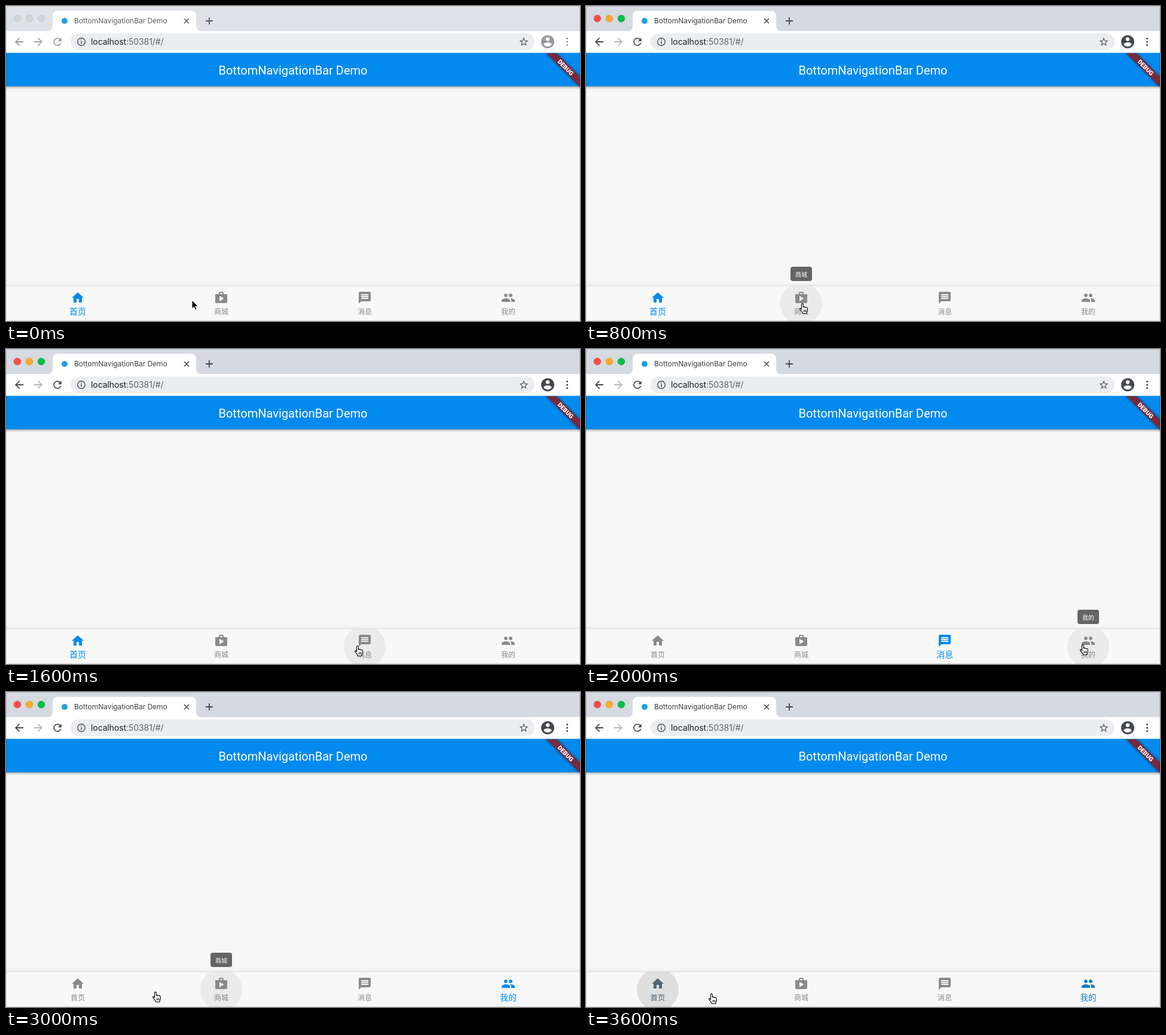
Write an HTML page that moves like this. It is 960 by 528 pixels and loops after 3.8 s.

```html
<!DOCTYPE html>
<html lang="zh">
<head>
<meta charset="utf-8">
<title>BottomNavigationBar Demo</title>
<style>
  html, body { margin: 0; width: 100%; height: 100%; overflow: hidden; }
  svg { display: block; width: 960px; height: 528px; --strip: #d5d9e0; --ink: #44484c; --dim: #b4b7ba; --title: #3c4043; --plus: #44484c; }
  svg.idle { --strip: #dfe2e6; --ink: #96999d; --dim: #a2a5a8; --title: #5c6064; --plus: #55595d; }
  .idle .light { fill: #d2d5d8; stroke: #c2c5c8; }
  .ui { font-family: Inter, Roboto, sans-serif; }
  .app { font-family: Roboto, sans-serif; text-anchor: middle; fill: #fff; }
  .cjk { font-family: "Noto Sans CJK SC", "Noto Sans CJK", sans-serif; text-anchor: middle; }
  .ink { fill: var(--ink); }
</style>
</head>
<body>
<svg id="stage" viewBox="0 0 960 528">
  <defs>
    <linearGradient id="drop" x2="0" y2="1">
      <stop stop-color="#4a3a30" stop-opacity=".5"/>
      <stop offset=".4" stop-color="#000" stop-opacity=".15"/>
      <stop offset="1" stop-color="#000" stop-opacity="0"/>
    </linearGradient>
    <linearGradient id="lift" x2="0" y2="1">
      <stop stop-color="#000" stop-opacity="0"/>
      <stop offset="1" stop-color="#000" stop-opacity=".05"/>
    </linearGradient>
    <filter id="blur" x="-20%" y="-60%" width="140%" height="220%"><feGaussianBlur stdDeviation="2.5"/></filter>
    <clipPath id="page"><rect y="79" width="960" height="449"/></clipPath>
    <clipPath id="bar"><rect y="469" width="960" height="59"/></clipPath>
  </defs>

  <!-- browser -->
  <rect width="960" height="42" fill="var(--strip)"/>
  <rect y="42" width="960" height="37" fill="#fff"/>
  <path d="M70 42a8 8 0 0 0 8-8V16a8 8 0 0 1 8-8H310a8 8 0 0 1 8 8V34a8 8 0 0 0 8 8Z" fill="#fff"/>
  <g stroke-width=".8">
    <circle class="light" cx="19" cy="21" r="5.8" fill="#fc4b48" stroke="#e0403d"/>
    <circle class="light" cx="39" cy="21" r="5.8" fill="#fdaa2c" stroke="#e0962a"/>
    <circle class="light" cx="59" cy="21" r="5.8" fill="#05c043" stroke="#08a63c"/>
  </g>
  <circle cx="98" cy="25" r="5" fill="#1f9fe0"/>
  <text class="ui" x="114" y="29" font-size="12" letter-spacing="-.05" fill="var(--title)">BottomNavigationBar Demo</text>
  <path d="M298 21l8 8m0-8l-8 8" stroke="var(--plus)" stroke-width="1.6"/>
  <path d="M334 25h12m-6-6v12" stroke="var(--plus)" stroke-width="1.8"/>
  <rect x="108" y="46" width="776" height="28" rx="14" fill="#ebedf0"/>
  <circle cx="126" cy="60" r="6.3" fill="none" stroke="#4a4e52" stroke-width="1.4"/>
  <path d="M126 59v4.4m0-7.4v1.6" stroke="#4a4e52" stroke-width="1.5"/>
  <text class="ui" x="142" y="65" font-size="14" letter-spacing="-.08" fill="#202124">localhost<tspan fill="#5f6368">:50381/#/</tspan></text>
  <g id="tools"></g>
  <g class="ink"><circle cx="938.5" cy="54.5" r="1.6"/><circle cx="938.5" cy="60" r="1.6"/><circle cx="938.5" cy="65.5" r="1.6"/></g>

  <!-- page -->
  <rect y="79" width="960" height="449" fill="#f7f7f7"/>
  <rect y="134" width="960" height="6" fill="url(#drop)"/>
  <rect y="78.5" width="960" height="56" fill="#028aee"/>
  <text class="app" x="480" y="114.5" font-size="20">BottomNavigationBar Demo</text>
  <g clip-path="url(#page)">
    <g transform="translate(960 79) rotate(45)">
      <rect x="-40" y="28" width="80" height="12" fill="#000" opacity=".5" filter="url(#blur)"/>
      <rect x="-40" y="28" width="80" height="12" fill="#752b3d"/>
      <text class="app" y="37.6" font-size="10.2" font-weight="900">DEBUG</text>
    </g>
  </g>
  <rect y="464" width="960" height="5" fill="url(#lift)"/>
  <rect y="469" width="960" height="59" fill="#f8f8f8"/>
  <rect y="468.5" width="960" height="1" fill="#e3e3e3"/>
  <g clip-path="url(#bar)"><circle id="halo" cy="499" r="35"/></g>
  <g id="items"></g>
  <g id="tip">
    <rect x="-18" y="437" width="36" height="24" rx="4" fill="#646464"/>
    <text class="cjk" y="453.5" font-size="10" font-weight="500" fill="#fff"></text>
  </g>
  <rect x=".5" y=".5" width="959" height="527" rx="4" fill="none" stroke="#000" stroke-opacity=".13"/>
  <g id="arrow"><path d="M0 0V14.5L3.3 11.4 5.6 16.6 8 15.6 5.7 10.5H10.2Z" fill="#000" stroke="#fff"/></g>
  <g id="hand" stroke="#000" stroke-width="1.1" stroke-linejoin="round">
    <path fill="#fff" d="M4.5 10.5V2.3a1.4 1.4 0 0 1 2.8 0V6.8c.3-1 2.3-.9 2.5.3 .5-.8 2.2-.5 2.4.6 .6-.7 2.1-.3 2.1 1v3.2c0 1.6-1 2.4-1.3 3.9v1.7H6.3v-1.4C5.3 14.3 3.2 12.8 1.7 10.3 .8 8.3 3 7.8 4.5 10.5Z"/>
    <path d="M8.2 11.2v3.6m1.8-3.6v3.6m1.8-3.6v3.6" stroke-width=".9"/>
  </g>
</svg>
<script>
const LOOP = 3800, STEP = 200;
const $ = id => document.getElementById(id);

const icon = (d, cx, cy, scale, fill) =>
  `<path d="${d}" fill="${fill}" fill-rule="evenodd" transform="translate(${cx} ${cy}) scale(${scale}) translate(-12 -12)"/>`;

const back = 'M20 11H7.83l5.59-5.59L12 4l-8 8 8 8 1.41-1.41L7.83 13H20v-2z';
$('tools').innerHTML =
  icon(back, 22, 60, .88, 'var(--ink)') +
  icon(back, 54, 60, '-.88 .88', 'var(--dim)') +
  icon('M17.65 6.35C16.2 4.9 14.21 4 12 4c-4.42 0-7.99 3.58-7.99 8s3.57 8 7.99 8c3.73 0 6.84-2.55 7.73-6h-2.08c-.82 2.33-3.04 4-5.65 4-3.31 0-6-2.69-6-6s2.69-6 6-6c1.66 0 3.14.69 4.22 1.78L13 11h7V4l-2.35 2.35z', 86, 60, .84, 'var(--ink)') +
  icon('M22 9.24l-7.19-.62L12 2 9.19 8.63 2 9.24l5.46 4.73L5.82 21 12 17.27 18.18 21l-1.63-7.03L22 9.24zM12 15.4l-3.76 2.27 1-4.28-3.32-2.88 4.38-.38L12 6.1l1.71 4.04 4.38.38-3.32 2.88 1 4.28L12 15.4z', 866, 60, .74, '#55595d') +
  icon('M12 2C6.48 2 2 6.48 2 12s4.48 10 10 10 10-4.48 10-10S17.52 2 12 2zm0 3c1.66 0 3 1.34 3 3s-1.34 3-3 3-3-1.34-3-3 1.34-3 3-3zm0 14.2c-2.5 0-4.71-1.28-6-3.22.03-1.99 4-3.08 6-3.08 1.99 0 5.97 1.09 6 3.08-1.29 1.94-3.5 3.22-6 3.22z', 906, 60, 1.1, 'var(--ink)');

const items = [
  ['首页', 'M10 20v-6h4v6h5v-8h3L12 3 2 12h3v8z'],
  ['商城', 'M16 6V4c0-1.11-.89-2-2-2h-4c-1.11 0-2 .89-2 2v2H2v13c0 1.11.89 2 2 2h16c1.11 0 2-.89 2-2V6h-6zm-6-2h4v2h-4V4zM9 18V9l7.5 4L9 18z'],
  ['消息', 'M20 2H4c-1.1 0-1.99.9-1.99 2L2 22l4-4h14c1.1 0 2-.9 2-2V4c0-1.1-.9-2-2-2zm-2 12H6v-2h12v2zm0-3H6V9h12v2zm0-3H6V6h12v2z'],
  ['我的', 'M16 11c1.66 0 2.99-1.34 2.99-3S17.66 5 16 5c-1.66 0-3 1.34-3 3s1.34 3 3 3zm-8 0c1.66 0 2.99-1.34 2.99-3S9.66 5 8 5C6.34 5 5 6.34 5 8s1.34 3 3 3zm0 2c-2.33 0-7 1.17-7 3.5V19h14v-2.5c0-2.33-4.67-3.5-7-3.5zm8 0c-.29 0-.62.02-.97.05 1.16.84 1.97 1.97 1.97 3.45V19h6v-2.5c0-2.33-4.67-3.5-7-3.5z']
];
const itemX = i => 120 + 240 * i;
$('items').innerHTML = items.map(([name, d], i) =>
  `<g>${icon(d, itemX(i), 489, 1, 'inherit')}<text class="cjk" x="${itemX(i)}" y="517.2">${name}</text></g>`).join('');
const groups = [...$('items').children];

// [time, x, y]
const path = [[0, 311, 493], [400, 349, 491], [600, 349, 491], [800, 356, 498], [1200, 406, 493],
  [1600, 582, 497], [1800, 650, 499], [2000, 825, 495], [2400, 826, 499], [2600, 781, 497],
  [2800, 440, 502], [3000, 244, 502], [3200, 216, 505], [3600, 204, 505]];
// [item, start, end]
const hovers = [[1, 800, 1400], [2, 1400, 2000], [3, 2000, 2800], [1, 2800, 3200], [0, 3200, LOOP]];
const tips = [[1, 800, 1200], [3, 2000, 2400], [1, 3000, 3200], [0, 3200, 3600]];
// [item, time]
const taps = [[0, -STEP], [2, 1760], [3, 2440], [0, 3560]];

const clamp = v => Math.max(0, Math.min(1, v));
const during = (list, t) => list.find(([, from, to]) => t >= from && t < to);

function cursorAt(t) {
  const k = path.findLastIndex(p => p[0] <= t), a = path[k], b = path[k + 1] || a;
  const u = a === b ? 0 : (t - a[0]) / (b[0] - a[0]);
  return [a[1] + (b[1] - a[1]) * u, a[2] + (b[2] - a[2]) * u];
}

// Tint from half-black to blue; resting items are plain grey.
function tint(p) {
  if (!p) return '#8a8a8a';
  return `rgba(${2 * p},${138 * p},${238 * p},${.54 + .46 * p})`;
}

function draw(t) {
  $('stage').classList.toggle('idle', t < 200);

  const level = [0, 0, 0, 0];
  for (const [item, at] of taps) {
    const p = clamp((t - at) / 200);
    for (let i = 0; i < 4; i++) level[i] += ((i === item) - level[i]) * p;
  }
  groups.forEach((g, i) => {
    g.setAttribute('fill', tint(level[i]));
    g.lastChild.setAttribute('font-size', 12 + 2 * level[i]);
  });

  const hover = during(hovers, t);
  const pressed = taps.some(([item, at]) => hover && item === hover[0] && t >= at && t < at + 300);
  $('halo').setAttribute('cx', hover ? itemX(hover[0]) : -99);
  $('halo').setAttribute('fill-opacity', pressed ? .1 : .05);

  const tip = during(tips, t);
  $('tip').setAttribute('transform', `translate(${tip ? itemX(tip[0]) : -99} 0)`);
  $('tip').lastElementChild.textContent = tip ? items[tip[0]][0] : '';

  const [x, y] = cursorAt(t), hand = t >= 800;
  $('arrow').style.display = hand ? 'none' : '';
  $('hand').style.display = hand ? '' : 'none';
  $(hand ? 'hand' : 'arrow').setAttribute('transform', `translate(${x} ${y})`);
}

const start = performance.now();
function tick() {
  const t = (performance.now() - start) % LOOP;
  draw(Math.floor(t / STEP) * STEP);
  requestAnimationFrame(tick);
}
tick();
</script>
</body>
</html>
```
